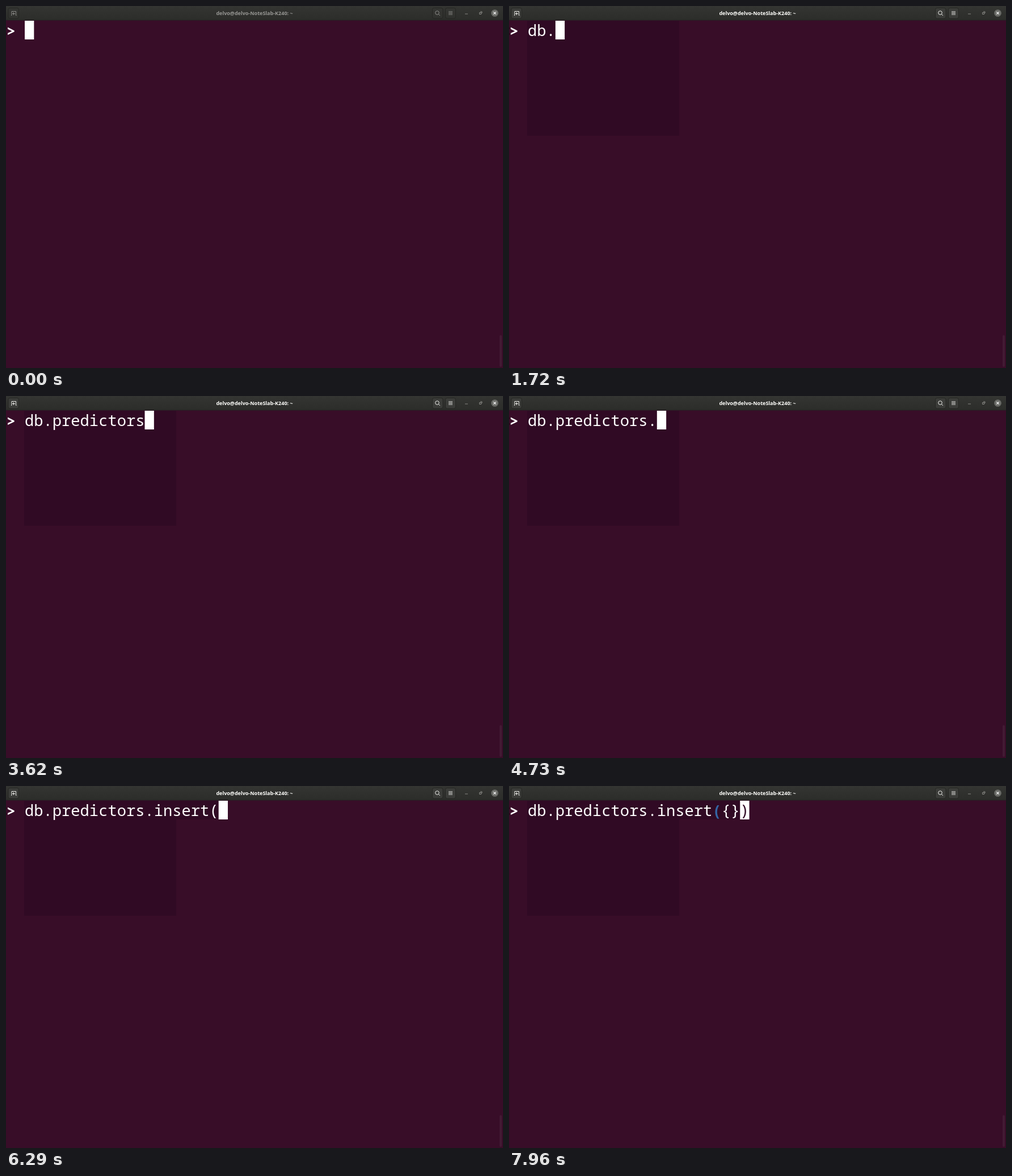
Write an HTML page that moves like this. It is 876 by 639 pixels and loops after 8 s.

```html
<!DOCTYPE html>
<html lang="en">
<head>
<meta charset="utf-8">
<title>Terminal</title>
<style>
  html, body { margin: 0; width: 100%; height: 100%; overflow: hidden; background: #380d28; }
  svg { display: block; width: 876px; height: 639px; }
  .mono { font: 27.12px "Noto Sans Mono", monospace; fill: #fff; }
  .bold { font-weight: bold; }
  .title { font: bold 9px "Noto Sans", sans-serif; text-anchor: middle; }
  .icon { fill: none; stroke: currentColor; stroke-width: .9; }
</style>
</head>
<body>
<svg viewBox="0 0 876 639">
  <defs>
    <linearGradient id="bar" x2="0" y2="1">
      <stop stop-color="#343532"/><stop offset="1" stop-color="#2c2d2a"/>
    </linearGradient>
  </defs>
  <rect width="876" height="639" fill="#380d28"/>
  <rect x="870" y="581" width="4" height="56" rx="2" fill="#431a34"/>

  <rect width="876" height="25" fill="url(#bar)"/>
  <rect y="24.5" width="876" height="1" fill="#252422"/>
  <g id="header">
    <g id="buttons" fill="#3b3c39" stroke="#242522">
      <rect x="4" y="3.5" width="18.5" height="18.5" rx="3"/>
      <rect x="751.5" y="3.5" width="18.5" height="18.5" rx="3"/>
      <rect x="774.5" y="3.5" width="18" height="18.5" rx="3"/>
    </g>
    <g class="icon">
      <path d="M9 16.5h1v-7h7.5v7h1M13.5 11v5M11 13.5h5"/>
      <circle cx="760" cy="12" r="3.3"/>
      <path d="M762.5 14.5l2.5 2.5M780 10h7M780 12.5h7M780 15h7"/>
    </g>
    <text class="title" x="438" y="15.8" fill="currentColor">delvo@delvo-NoteSlab-K240: ~</text>
  </g>
  <g class="icon" color="#91918e">
    <path d="M809 14h5M834.5 11.5h3v3h-3zM836 10h3v3"/>
  </g>
  <circle cx="861.5" cy="12.5" r="6.3" fill="#6b6c68"/>
  <path d="M859.3 10.3l4.4 4.4m0-4.4l-4.4 4.4" stroke="#fff" stroke-width="1.2"/>

  <g id="shade" fill="#300a24">
    <rect x="32" y="26" width="268" height="203"/>
    <rect id="rowShade" x="32" y="26" height="33"/>
  </g>
  <text class="mono bold" x=".8" y="54">&gt;</text>
  <rect id="cursor" y="26" width="16.3" height="33" fill="#fff"/>
  <rect id="hollow" x="33.5" y="26.5" width="15.5" height="32" fill="none" stroke="#fff"/>
  <text class="mono" x="33" y="53"><tspan id="head"></tspan><tspan id="paren"></tspan><tspan id="inner"></tspan><tspan id="under" fill="#300a24"></tspan></text>
  <path id="pointer" d="M0 .5h2.5l1 1 1-1H7M3.5 1.5v8M0 10.5h2.5l1-1 1 1H7" fill="none" stroke="#fff"/>
</svg>
<script>
const LOOP = 8000, CELL = 16.27, PROMPT = 2;
const COMMAND = 'db.predictors.insert()';
const OPEN = COMMAND.indexOf('(');
const KEY_TIMES = [
  980, 1290, 1720, 1870, 1960, 2160, 2680, 2880, 2950, 3240, 3345,
  3450, 3620, 4730, 5010, 5210, 5310, 5500, 5720, 5910, 6290, 6490
];
const el = Object.fromEntries([...document.querySelectorAll('[id]')].map(e => [e.id, e]));
const cellX = column => 0.5 + CELL * column;
const show = (node, on) => node.setAttribute('visibility', on ? 'visible' : 'hidden');

function editState(t) {
  const typed = KEY_TIMES.filter(k => k <= t).length;
  if (t >= 7960) return { text: COMMAND.replace('()', '({})'), caret: 23, matched: true, reach: 23 };
  if (t >= 7770) return { text: COMMAND.replace('()', '({)'), caret: 22, matched: false, reach: 22 };
  if (t >= 6990) return { text: COMMAND, caret: 21, matched: true, reach: 22 };
  return { text: COMMAND.slice(0, typed), caret: typed, matched: false, reach: typed };
}

function drawHeader(t) {
  const focus = t < 800 ? 0 : t < 890 ? 0.4 : t < 980 ? 0.8 : 1;
  const level = Math.round(150 + 105 * focus);
  el.header.style.color = `rgb(${level},${level},${level - 3})`;
  el.buttons.setAttribute('fill-opacity', 0.25 + 0.75 * focus);
}

function drawPointer(t) {
  show(el.pointer, t >= 420 && t < 980);
  el.pointer.setAttribute('transform', t < 540 ? 'translate(87.5 254.5)' : 'translate(290.5 219)');
}

function draw(t) {
  const { text, caret, matched, reach } = editState(t);
  const split = Math.max(caret, OPEN + 1);
  const hollow = t >= 140 && t < 800;
  const blinkedOff = t >= 4220 && t < 4620;

  drawHeader(t);
  drawPointer(t);
  show(el.shade, t >= 980);
  el.rowShade.setAttribute('width', Math.max(268, Math.ceil(cellX(reach + PROMPT + 1)) - 32));
  show(el.hollow, hollow);
  show(el.cursor, !hollow && !blinkedOff);
  el.cursor.setAttribute('x', cellX(caret + PROMPT));

  el.head.textContent = text.slice(0, OPEN);
  el.paren.textContent = text.slice(OPEN, OPEN + 1);
  el.paren.setAttribute('fill', matched ? '#3465a4' : '#fff');
  el.paren.classList.toggle('bold', matched);
  el.inner.textContent = text.slice(OPEN + 1, split);
  el.under.textContent = text.slice(split);
}

const start = performance.now();
function tick() {
  draw((performance.now() - start) % LOOP);
  requestAnimationFrame(tick);
}
tick();
</script>
</body>
</html>
```
